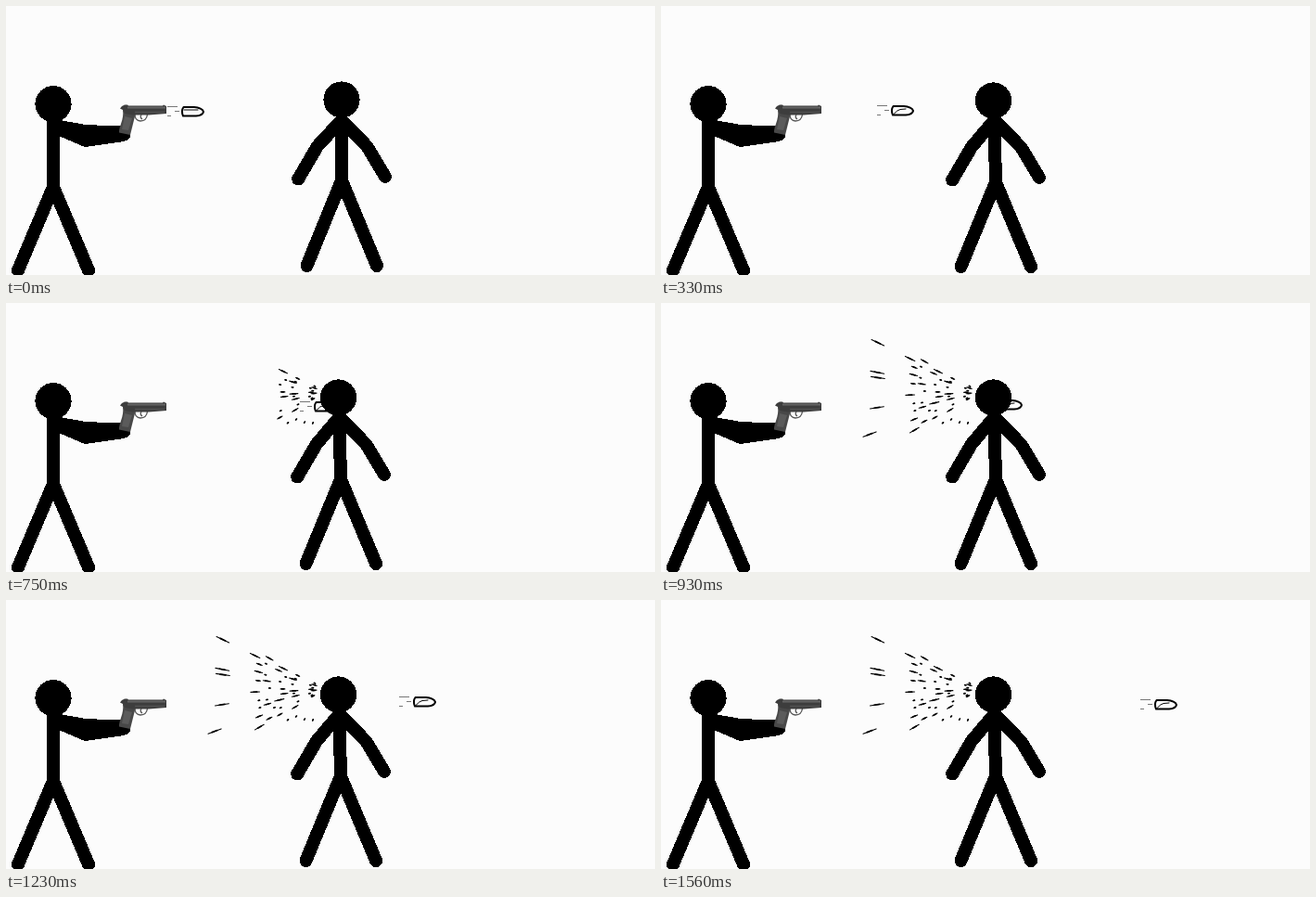
An HTML page that plays this animation: 700x290 px, repeating every 1590 ms.

```html
<!DOCTYPE html>
<html lang="en">
<head>
<meta charset="utf-8">
<title>Stick figures</title>
<style>
html, body { margin: 0; width: 100%; height: 100%; overflow: hidden; background: #fcfcfc; }
svg { display: block; width: 700px; height: 290px; }
.limb { fill: none; stroke: #000; stroke-width: 14; stroke-linecap: round; stroke-linejoin: round; }
.ink { fill: none; stroke: #000; stroke-linecap: round; stroke-linejoin: round; }
.figure { shape-rendering: crispEdges; }
</style>
</head>
<body>
<svg viewBox="0 0 700 290">
  <rect width="700" height="290" fill="#fcfcfc"/>
  <g id="bullet" class="ink">
    <path d="M-40 -5.5h11M-32 -.5h5M-40 4.5h4" stroke="#777" stroke-linecap="butt"/>
    <path d="M-22.5 -5H-11C-6 -4.8 -1.5 -2.5 -1 0C-1.5 2.5 -5 4.3 -9 4.6H-23C-24.5 1 -24 -3 -22.5 -5Z" stroke-width="2"/>
    <path id="shine"/>
  </g>
  <g id="spray" class="ink"></g>

  <g class="figure">
    <circle cx="51" cy="105.6" r="19.6"/>
    <path class="limb" d="M51 118V195M13 285L51 195L89 285"/>
    <path d="M52 122L88 128.3L123 129L133 134Q137 140 131 144.5L127 146L85 152L52 138Z"/>
  </g>

  <g id="gun">
    <path d="M126 112L140 115L134 139L122 136.5Q121.5 134 124 127Q127 119 126 112Z" fill="#484848"/>
    <path d="M128 119L136 121L132 134L125 133Z" fill="#5b5b5b"/>
    <path d="M139 117Q139 123.5 145 124Q151.5 124 152.5 117M146 117Q144 120 147 122" fill="none" stroke="#555" stroke-width="1.3"/>
    <path d="M125 108L128 106.5H131L132 107.5H169L170 106.5L173 108V116L154 117.5H137L128 116L126 112L123 110.5Z" fill="#3d3d3d"/>
    <path d="M131 109.5H172" stroke="#646464" stroke-width="2"/>
    <path d="M139 114.5H171" stroke="#505050" stroke-width="1.5"/>
  </g>

  <g class="figure">
    <circle id="head" r="19.6"/>
    <path id="body" class="limb"/>
  </g>
</svg>
<script>
const LOOP = 1590, STEP = 30;
const $ = id => document.getElementById(id);

// key points: time, tip x, tip y
const flight = [
  [0, 213.5, 114.3], [150, 241, 115.3], [330, 273, 112.6], [600, 330.5, 113.5],
  [930, 389.5, 109.5], [1230, 463.5, 109.5], [1560, 556.5, 112.6]
];

let seed = 11;
function rnd() {
  seed = (seed * 16807) % 2147483647;
  return seed / 2147483647;
}
const between = (a, b) => a + (b - a) * rnd();

const wound = { x: 345, y: 96 };
const drops = [];

// slope is the fall of the drop per pixel away from the head
function addDrop(dist, slope, len) {
  const x = wound.x - dist, y = wound.y + dist * slope;
  const a = Math.atan(-slope);
  const dx = len / 2 * Math.cos(a), dy = len / 2 * Math.sin(a);
  const stroke = (k, w) =>
    `<path d="M${x - dx * k} ${y - dy * k}L${x + dx * k} ${y + dy * k}" stroke-width="${w}"/>`;
  const el = document.createElementNS("http://www.w3.org/2000/svg", "g");
  el.innerHTML = stroke(1, 1.1) + stroke(0.4, 1.7);
  $("spray").append(el);
  drops.push({ el, at: 660 + dist * 1.8 });
}

function buildSpray() {
  const RAYS = 9, RINGS = 5;
  for (let ring = 0; ring < RINGS; ring++) {
    for (let ray = 0; ray < RAYS; ray++) {
      const dist = 16 + ring * 14.5 + between(-4, 6);
      const slope = -0.52 + ray / (RAYS - 1) * 1.06 + between(-0.05, 0.05);
      const len = rnd() < 0.4 ? 2 : between(4, 7 + ring * 1.7);
      addDrop(dist, slope, len);
    }
  }
  // the outer edge and a few drips under the head
  for (const slope of [-0.48, -0.19, -0.14, 0.15, 0.38]) addDrop(between(108, 121), slope, 15);
  for (let i = 0; i < 4; i++) addDrop(14 + i * 9, between(1, 3) / (1 + i * 0.5), 2);
}

const mix = (a, b, k) => a + (b - a) * k;

function tipAt(t) {
  const i = Math.max(1, flight.findIndex(p => p[0] >= t));
  const [t0, x0, y0] = flight[i - 1], [t1, x1, y1] = flight[i];
  const k = (t - t0) / (t1 - t0);
  return [mix(x0, x1, k), mix(y0, y1, k)];
}

// k = 1 stands upright, k = 0 leans back
function pose(k) {
  const neck = `${359.5 + 2.5 * k} 123`, hip = `${361 + k} ${190 - 2 * k}`;
  const at = (x, y) => `${x + k} ${y - k}`;
  $("head").setAttribute("cx", 358.5 + 3.5 * k);
  $("head").setAttribute("cy", 102 - k);
  $("body").setAttribute("d",
    `M${neck}L${hip}M${at(314.2, 187.5)}L${at(335, 152)}L${neck}L${at(388.5, 152.5)}L${at(408, 185)}` +
    `M${at(323.5, 281)}L${hip}L${at(399, 281)}`);
}

function draw(time) {
  const t = Math.floor((time % LOOP) / STEP) * STEP;
  const first = t < STEP;
  const [x, y] = tipAt(t);
  $("bullet").setAttribute("transform", `translate(${Math.round(x)} ${Math.round(y)})`);
  $("shine").setAttribute("d", first ? "M-22 -2H-7" : "M-22 3.5Q-18 -1 -15 -1.5L-9 -2");
  pose(first ? 1 : 0);
  for (const d of drops) d.el.style.display = t >= d.at ? "" : "none";
}

buildSpray();
const start = performance.now();
function tick() {
  draw(performance.now() - start);
  requestAnimationFrame(tick);
}
tick();
</script>
</body>
</html>
```
